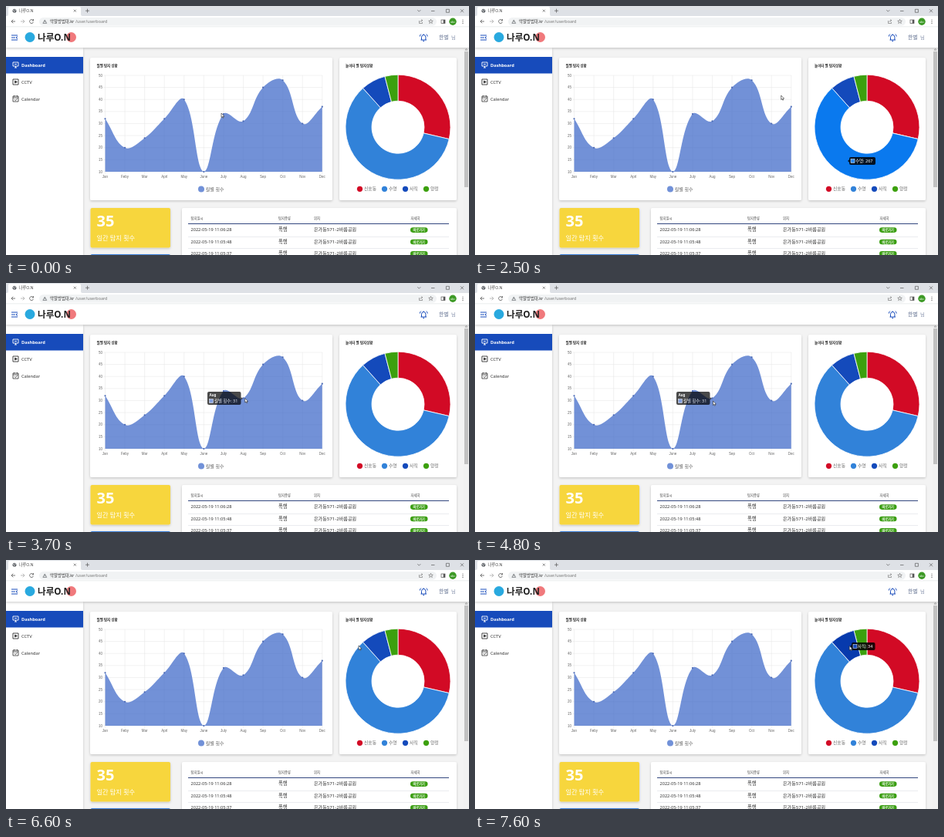
An HTML page for the animation above (8 s loop, 600 px wide and 323 px high).

```html
<!DOCTYPE html>
<html lang="ko">
<head>
<meta charset="utf-8">
<title>나루O.N</title>
<style>
html, body { margin: 0; width: 100%; height: 100%; overflow: hidden; background: #f3f3f3; }
svg { display: block; width: 600px; height: 323px; font-family: "Noto Sans", "Noto Sans CJK KR", "Noto Sans CJK", sans-serif; }
.axis { font-family: "Liberation Sans", Arial, sans-serif; }
</style>
</head>
<body>
<svg id="stage" viewBox="0 0 600 323">
  <defs>
    <filter id="shade" x="-10%" y="-10%" width="120%" height="125%">
      <feDropShadow dx="0" dy="1.2" stdDeviation="1.5" flood-color="#000" flood-opacity=".2"/>
    </filter>
  </defs>
</svg>
<script>
const NS = 'http://www.w3.org/2000/svg';
const stage = document.getElementById('stage');
let layer = stage;

function el(tag, attrs, text) {
  const n = document.createElementNS(NS, tag);
  for (const k in attrs) n.setAttribute(k, attrs[k]);
  if (text) n.textContent = text;
  layer.appendChild(n);
  return n;
}
const rect = (x, y, width, height, fill, more) => el('rect', { x, y, width, height, fill, ...more });
const disc = (cx, cy, r, fill, more) => el('circle', { cx, cy, r, fill, ...more });
const line = (d, stroke, w, more) => el('path', { d, stroke, fill: 'none', 'stroke-width': w, ...more });
const text = (s, x, y, size, fill, more) => el('text', { x, y, 'font-size': size, fill, ...more }, s);
const card = (x, y, w, h, fill) => rect(x, y, w, h, fill, { rx: 2, filter: 'url(#shade)' });
const bold = { 'font-weight': 700 };
const NAVY = '#174bbb';

// Page background and scrollbar
rect(0, 0, 600, 323, '#f3f3f3');
rect(593, 54, 7, 269, '#f1f1f1');
rect(594, 59, 5, 176, '#c1c1c1');
line('M595 57.2l1.5-1.8l1.5 1.8z', '#777', .5);

// Sidebar
rect(0, 54, 100, 269, '#fff', { filter: 'url(#shade)' });
rect(0, 66, 100, 21.5, NAVY);
text('Dashboard', 20, 79, 5.7, '#fff', { 'font-weight': 600 });
text('CCTV', 20, 101, 5.7, '#333');
text('Calendar', 20, 123, 5.7, '#333');
line('M9 73h7v5h-7zM11 80h3M12.5 78v2M11 75.5h3', '#fff', .9);
line('M9 95h7v7h-7z', '#333', .9);
line('M11.5 97l3 1.5l-3 1.5z', '#333', .7, { fill: '#333' });
line('M9 117h7v7h-7zM9 119h7M10.7 116v1.5M14.3 116v1.5M11 121.3l1.3 1.3l2.2-2.4', '#333', .8);

// Header
rect(0, 27, 600, 27, '#fff', { filter: 'url(#shade)' });
line('M7 38h8M7 41h5M7 44h8M15 39.5l-2 1.5l2 1.5', NAVY, 1);
disc(31, 40.5, 6.5, '#29a9df');
disc(84.5, 40.5, 6.5, '#f0797c');
text('나루O.N', 41, 45, 11.6, '#222', bold);
line('M537.5 44h7.5M538.5 44v-3.5a2.7 3 0 0 1 5.4 0v3.5M541.2 36.3v1.2M540.3 45.5h1.8M536.3 39.5q.2-2 1.5-3M546.2 39.5q-.2-2-1.5-3', NAVY, 1);
text('한별', 561, 42.7, 6.8, '#5c6b8c');
text('님', 577, 43, 6.2, '#7c89a5');

// Browser frame
rect(0, 0, 600, 13, '#dee1e6');
el('path', { d: 'M1 13q2 0 2-2V3q0-2 2-2h90q2 0 2 2v8q0 2 2 2z', fill: '#fff' });
disc(11, 6.2, 2.5, '#5f6368');
line('M9 5.2l2 1l-.5 1.8M11.5 4l.7 1.3l1.2.2', '#fff', .6);
text('나루O.N', 16.5, 8.1, 5.3, '#444');
line('M87.8 4.7l3 3m0-3l-3 3M103 6.2h5M105.5 3.7v5', '#555', .7);
line('M533.3 5.2l2 2l2-2M551 6.5h4.5M570.4 4.3h4v4h-4zM589 4.3l4 4m0-4l-4 4', '#444', .6);
rect(0, 13, 600, 14, '#fff');
rect(43, 15, 515, 10.5, '#f1f3f4', { rx: 5.2 });
line('M12 20H7m2.3-2.3L7 20l2.3 2.3', '#555', .8);
line('M19 20h5m-2.3-2.3L24 20l-2.3 2.3', '#aaa', .8);
line('M35.2 18.6a2.5 2.5 0 1 0 .3 2.2M35.5 17v2h-2', '#555', .8);
line('M50.3 18l2.4 4.4h-4.8zM50.3 19.6v1.4', '#5f6368', .7);
text('딱알방범대.kr', 57, 22.2, 5.4, '#333');
text('/user/userboard', 90, 22.2, 5.4, '#777');
line('M535.5 19v3.5h4V21M537 20.7q.3-2 2.6-2m-1.2-1.2l1.4 1.2l-1.4 1.2', '#666', .6);
line('M550.5 17.3l.8 1.9l2 .1l-1.6 1.2l.6 2l-1.8-1.1l-1.8 1.1l.6-2l-1.6-1.2l2-.1z', '#666', .6);
rect(564, 18, 5, 4.5, 'none', { stroke: '#555', 'stroke-width': .7 });
rect(566.7, 18, 2.3, 4.5, '#555');
disc(579, 20.2, 4.7, '#3d9a26');
text('abc', 579, 21.5, 3.6, '#fff', { 'text-anchor': 'middle' });
[18, 20.2, 22.4].forEach(y => disc(592, y, .6, '#555'));
rect(0, 26.6, 600, .6, '#dcdee2');

// Area chart
card(109, 67, 314, 185, '#fff');
text('월별 탐지 상황', 117.5, 78.8, 4.5, '#222', bold);
const months = 'Jan Feby Mar Aprl May June July Aug Sep Oct Nov Dec'.split(' ');
const hits = [32, 20, 24, 32, 40, 10, 34, 31, 45, 48, 30, 37];
const px = i => 128.5 + i * 25.57;
const py = v => 90 + (50 - v) * 3.125;
for (let v = 10; v <= 50; v += 5) {
  line(`M125.5 ${py(v)}H409.8`, '#e4e4e4', .5);
  text(String(v), 125, py(v) + 1.6, 4.5, '#666', { 'text-anchor': 'end', class: 'axis' });
}
months.forEach((m, i) => {
  line(`M${px(i)} 90V218`, '#e4e4e4', .5);
  text(m, px(i), 223.3, 4.5, '#666', { 'text-anchor': 'middle', class: 'axis' });
});

const pts = hits.map((v, i) => [px(i), py(v)]);
const clampY = y => Math.min(215, Math.max(90, y));
// Control points before and after each value, tension 0.4
const handles = pts.map((p, i) => {
  const a = pts[i - 1] || p, b = pts[i + 1] || p;
  const da = Math.hypot(p[0] - a[0], p[1] - a[1]), db = Math.hypot(b[0] - p[0], b[1] - p[1]);
  const at = k => [p[0] + k * (b[0] - a[0]), clampY(p[1] + k * (b[1] - a[1]))];
  return [at(-.4 * da / (da + db)), at(.4 * db / (da + db))];
});
let area = `M128.5 215L${pts[0]}`;
for (let i = 1; i < pts.length; i++) area += `C${handles[i - 1][1]} ${handles[i][0]} ${pts[i]}`;
el('path', { d: area + 'V215Z', fill: 'rgb(70,111,203)', 'fill-opacity': .76 });
pts.forEach(p => disc(p[0], p[1], 1.1, '#4968b4'));
disc(253, 237.6, 4, '#7191d8');
text('월별 횟수', 258.8, 239.8, 6, '#666');

// Doughnut
card(432, 67, 152, 185, '#fff');
text('놀이터 별 탐지상황', 440, 78.8, 4.5, '#222', bold);
const CX = 508, CY = 157.2;
const parts = [
  ['신호동', 128, '#d20a25', 458.5],
  ['수영', 267, '#3182d9', 490.5],
  ['사직', 34, '#144abb', 517.5],
  ['양정', 18, '#3ca00e', 544.5]
];
const total = parts.reduce((s, p) => s + p[1], 0);
const polar = (a, r) => [CX + r * Math.sin(a), CY - r * Math.cos(a)];
let turn = 0;
const slices = parts.map(([name, n, fill, x]) => {
  const a = turn, b = turn += n / total * 2 * Math.PI, big = +(b - a > Math.PI);
  disc(x, 237.3, 3.6, fill);
  text(name, x + 5.5, 239.3, 5.8, '#666');
  return el('path', {
    d: `M${polar(a, 68)}A68 68 0 ${big} 1 ${polar(b, 68)}L${polar(b, 34)}A34 34 0 ${big} 0 ${polar(a, 34)}Z`,
    fill, stroke: '#fff', 'stroke-width': .8
  });
});
function glow(i, fill) {
  return el('path', { d: slices[i].getAttribute('d'), fill, stroke: '#fff', 'stroke-width': .8, opacity: 0 });
}
const blueGlow = glow(1, '#0a79ee');
const navyGlow = glow(2, '#073aad');

// Lower cards
card(109.5, 262, 103.5, 51.5, '#f7d63e');
text('35', 117.5, 286.3, 20, '#fff', { 'font-weight': 600 });
text('일간 탐지 횟수', 117.5, 303.8, 8.2, '#fff');
card(109.5, 322, 103.5, 20, '#3b7fd9');
card(228, 262, 356, 80, '#fff');
[['탐지일시', 239.5], ['탐지종류', 353], ['위치', 399], ['자세히', 524.5]]
  .forEach(([s, x]) => text(s, x, 276.8, 4.4, '#444', { 'font-weight': 500 }));
rect(236, 282, 338, 1, '#33477f');
['11:06:28', '11:05:48', '11:05:37'].forEach((clock, i) => {
  const y = 292.3 + i * 15.4;
  text('2022-05-19 ' + clock, 239.5, y, 5.6, '#333');
  text('폭행', 353, y, 6.3, '#333');
  text('은가동571-2바름공원', 399, y, 6.1, '#333');
  rect(524, y - 5, 22.5, 6.6, '#3a9e12', { rx: 3.3 });
  text('바로가기', 535.2, y - .2, 4.2, '#fff', { 'text-anchor': 'middle', ...bold });
  rect(236, y + 6.7, 338, .5, '#d5d8de');
});

// Tooltips
function tip(draw) {
  const g = layer = el('g', { opacity: 0 });
  draw();
  layer = stage;
  return g;
}
const dark = { rx: 2, 'fill-opacity': .85 };
const swatch = (x, y, fill) => rect(x, y, 5, 5, fill, { stroke: '#fff', 'stroke-width': .5 });
const monthTip = tip(() => {
  rect(261, 141, 43.5, 17, '#000', dark);
  el('path', { d: 'M304.5 148l2.3 1.8l-2.3 1.8z', 'fill-opacity': .85 });
  text('Aug', 263.5, 147.2, 4.6, '#fff', { class: 'axis', ...bold });
  swatch(263.5, 150.6, '#6f90da');
  text('월별 횟수: 31', 270, 155.2, 5.4, '#fff');
});
function sliceTip(x, y, w, fill, label) {
  return tip(() => {
    rect(x, y, w, 10, '#000', dark);
    el('path', { d: `M${x} ${y + 3.2}l-2 1.8l2 1.8z`, 'fill-opacity': .85 });
    swatch(x + 2, y + 2.5, fill);
    text(label, x + 8, y + 7, 5.5, '#fff');
  });
}
const blueTip = sliceTip(485, 196, 34, '#2d8af0', '수영: 267');
const navyTip = sliceTip(488, 107, 30.5, '#144abb', '사직: 34');

const pointer = el('path', {
  d: 'M0 0V5.5L1.3 4.4L2.1 6.2L3 5.8L2.2 4.1H3.9Z',
  fill: '#fff', stroke: '#222', 'stroke-width': .6, 'stroke-linejoin': 'round'
});

// Pointer stops: time, x, y
const path = [
  [0, 279, 139], [100, 279, 139], [900, 222, 102], [1299, 222, 102],
  [1300, 450, 76], [1400, 450, 76], [1700, 468, 84], [2000, 414, 98], [2300, 468, 116],
  [2400, 450, 122], [2500, 396.7, 116], [2700, 396.7, 116], [3400, 312, 138], [3600, 301, 146],
  [3700, 309.7, 149.5], [4300, 309.7, 149.5], [4600, 306, 160], [4900, 309.7, 149.5],
  [5500, 309.7, 149.5], [6000, 450, 156.5], [6100, 457.2, 156.5], [6300, 457.2, 156.5],
  [6600, 457, 111], [6900, 451, 112], [7200, 470, 119], [7400, 485.2, 111.5], [8000, 485.2, 111.5]
];
function pointAt(t) {
  const i = Math.max(1, path.findIndex(p => p[0] >= t));
  const [t0, x0, y0] = path[i - 1], [t1, x1, y1] = path[i];
  const k = (t - t0) / (t1 - t0);
  return [x0 + (x1 - x0) * k, y0 + (y1 - y0) * k];
}
function shown(t, spans) {
  return Math.max(...spans.map(([a, b]) =>
    t < a ? 0 : Math.max(0, Math.min(1, (t - a + 250) / 300, 1 - (t - b) / 200))));
}
const fade = (k, ...nodes) => nodes.forEach(n => n.setAttribute('opacity', k));

function render(ms) {
  const t = Math.floor(ms % 8000 / 100) * 100;
  pointer.setAttribute('transform', `translate(${pointAt(t)})`);
  fade(shown(t, [[2400, 2600], [6200, 6400], [7000, 7300]]), blueGlow, blueTip);
  fade(shown(t, [[7400, 8000]]), navyGlow, navyTip);
  fade(shown(t, [[3700, 4400], [4800, 5600]]), monthTip);
}
const start = performance.now();
function tick() {
  render(performance.now() - start);
  requestAnimationFrame(tick);
}
tick();
</script>
</body>
</html>
```
